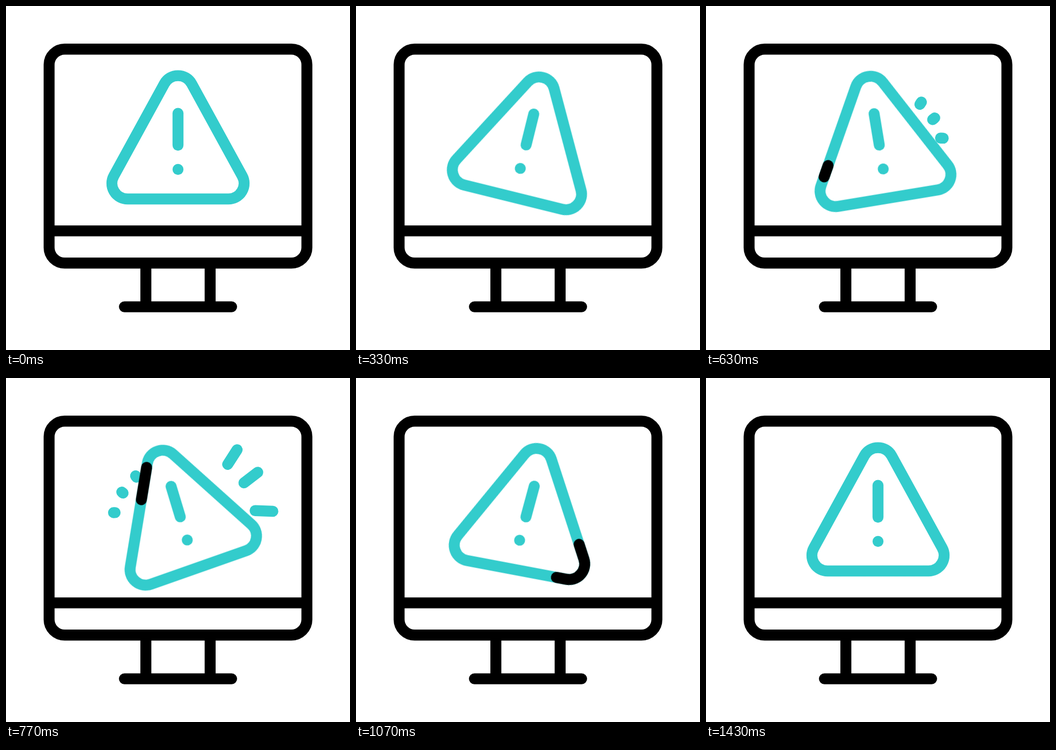
These frames come from a looping animation (640x640 px, 1670 ms). An HTML page:

```html
<!DOCTYPE html>
<html lang="en">
<head>
<meta charset="utf-8">
<title>Warning on a monitor</title>
<style>
  @property --from { syntax: "<number>"; inherits: true; initial-value: 0; }
  @property --to { syntax: "<number>"; inherits: true; initial-value: 0; }

  html, body { margin: 0; width: 100%; height: 100%; overflow: hidden; background: #fff; }
  svg { display: block; width: 100vw; height: 100vh; }

  .line { fill: none; stroke: #000; stroke-width: 20.4; }
  .teal { stroke: #3cc; }
  .round { stroke-linecap: round; }

  .sign, .mark, .runner, .rays {
    animation: 1670ms cubic-bezier(.333, 0, .667, 1) infinite;
  }
  .sign, .mark { transform-origin: 320px 244.3px; }
  .sign { animation-name: sway; }
  .mark { animation-name: swayMark; }

  /* Part of a path between --from and --to, in percent of its length */
  .runner, .rays {
    opacity: 0;
    stroke-linecap: round;
    stroke-dasharray: calc((var(--to) - var(--from)) * 1px) 300px;
    stroke-dashoffset: calc(var(--from) * -1px);
  }
  .runner { animation-name: runTail, runHead, runShow; }
  .rays { animation-name: rayTail, rayHead, rayShow; }
  .left { animation-delay: 147ms; }

  @keyframes sway {
    0%, 8% { transform: rotate(0deg); }
    30% { transform: rotate(25deg); }
    42.3% { transform: rotate(-24.5deg); }
    59.7% { transform: rotate(16deg); }
    74.6% { transform: rotate(-9deg); }
    86%, 100% { transform: rotate(0deg); }
  }
  @keyframes swayMark {
    0%, 8% { transform: rotate(0deg); }
    30% { transform: rotate(25deg); }
    42.3% { transform: rotate(-24.5deg); }
    57.8% { transform: rotate(25deg); }
    75.6% { transform: rotate(-9deg); }
    86%, 100% { transform: rotate(0deg); }
  }

  @keyframes runHead {
    0%, 30% { --to: 0; animation-timing-function: cubic-bezier(.333, .206, .667, .905); }
    79%, 100% { --to: 100; }
  }
  @keyframes runTail {
    0%, 30% { --from: 0; animation-timing-function: cubic-bezier(.333, .177, .667, .598); }
    79%, 100% { --from: 100; }
  }
  @keyframes runShow {
    0% { opacity: 0; animation-timing-function: step-end; }
    30.5% { opacity: 1; animation-timing-function: step-end; }
    78.8%, 100% { opacity: 0; }
  }

  @keyframes rayHead {
    0%, 36% { --to: 0; }
    46%, 100% { --to: 100; }
  }
  @keyframes rayTail {
    0%, 41.5% { --from: 0; }
    51.5%, 100% { --from: 100; }
  }
  @keyframes rayShow {
    0% { opacity: 0; animation-timing-function: step-end; }
    36.2% { opacity: 1; animation-timing-function: step-end; }
    51.4%, 100% { opacity: 0; }
  }
</style>
</head>
<body>
<svg viewBox="0 0 640 640">
  <defs>
    <path id="triangle" pathLength="100" d="M226 359A29 29 0 0 1 200.6 316.1L294.6 144.6A29 29 0 0 1 345.4 144.6L439.4 316.1A29 29 0 0 1 414 359Z"/>
  </defs>

  <g class="line">
    <rect x="80.2" y="80.2" width="479.6" height="398.1" rx="29"/>
    <path d="M80 418.4H560M260.2 478V559M379.8 478V559"/>
    <path class="round" d="M220.3 559.6H419.7"/>
  </g>

  <g class="line teal rays">
    <path pathLength="100" d="M398 183L430 133.4"/>
    <path pathLength="100" d="M421.6 211.3L468.4 175.4"/>
    <path pathLength="100" d="M436.3 245.7L496.5 248"/>
  </g>
  <g class="line teal rays left">
    <path pathLength="100" d="M242.7 184.5L211 134.9"/>
    <path pathLength="100" d="M217.8 214.1L171 178.2"/>
    <path pathLength="100" d="M203 250.4L144.8 251.8"/>
  </g>

  <g class="line sign">
    <use href="#triangle" class="teal"/>
    <use href="#triangle" class="runner"/>
  </g>
  <g class="mark">
    <path class="line teal round" d="M320 199.6V259"/>
    <circle cx="320" cy="304" r="10.2" fill="#3cc"/>
  </g>
</svg>
</body>
</html>
```
